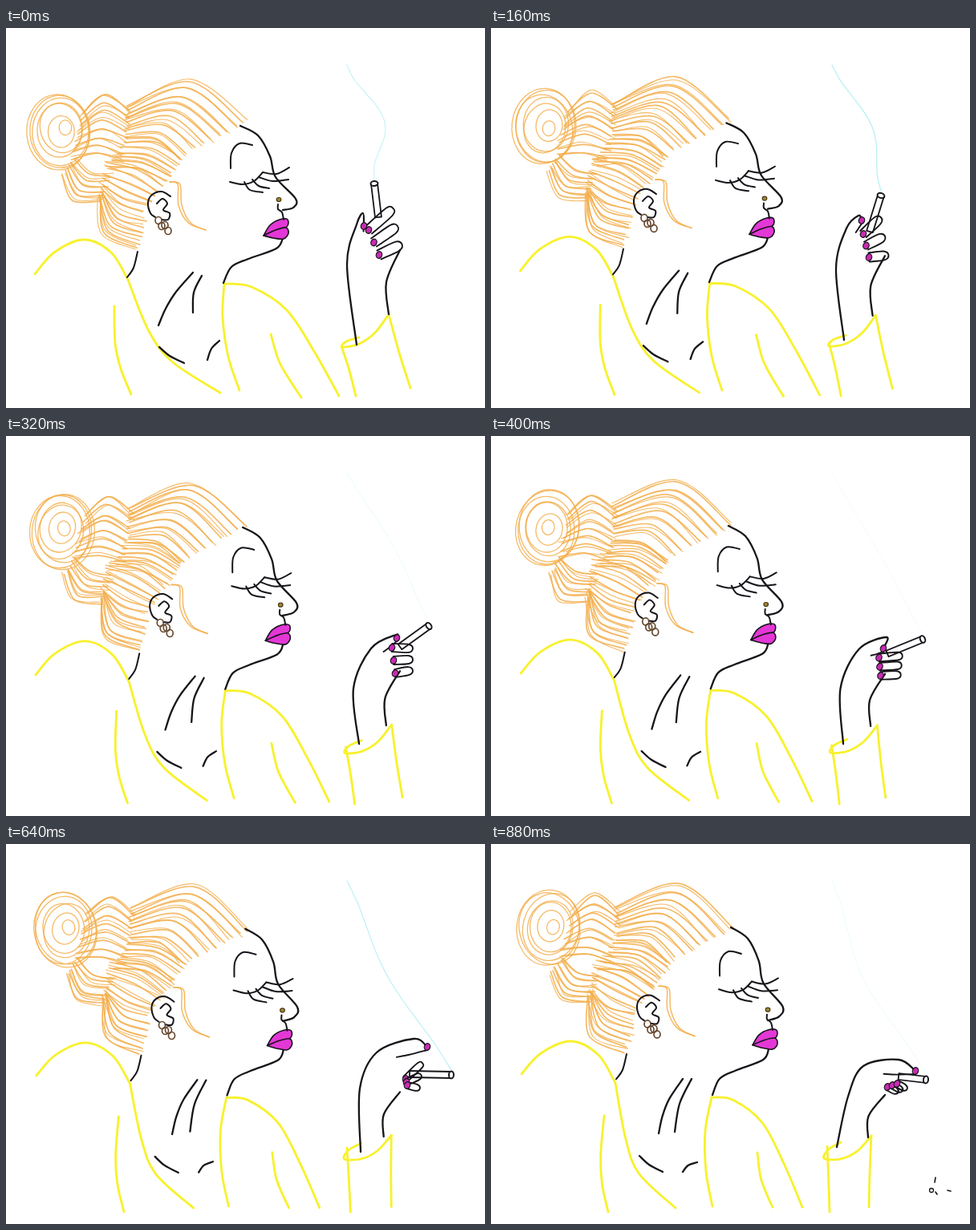
Animation of 597x474 px, one loop 960 ms. Source, as an HTML page with a canvas:

```html
<!DOCTYPE html>
<html lang="en">
<head>
<meta charset="utf-8">
<title>Smoker</title>
<style>
html, body { margin: 0; width: 100%; height: 100%; overflow: hidden; background: #fff; }
canvas { display: block; }
</style>
</head>
<body>
<canvas id="stage" width="597" height="474"></canvas>
<script>
const g = document.getElementById('stage').getContext('2d');
const INK = '#17141a', YELLOW = '#f8f12c', HAIR = '#f4ae4c', PINK = '#e337d6', SMOKE = '#b5eff5';
const STEP = 80, COUNT = 12;

const mix = (a, b, k) => a + (b - a) * k;
const rnd = n => { const v = Math.sin(n * 127.1 + 11.7) * 43758.5453; return v - Math.floor(v); };

// Key poses sit on every second drawing, the last two close together.
const poseAt = step => step < 9 ? step / 2 : step === 9 ? 5 : step / 2 + .5;

function at(poses, p) {
  const a = poses[Math.floor(p)], b = poses[Math.ceil(p)];
  return a.map ? a.map((v, i) => mix(v, b[i], p % 1)) : mix(a, b, p % 1);
}

function curve(c, color, width, fill) {
  const n = c.length / 2 - 1;
  const pt = i => { const j = 2 * Math.max(0, Math.min(n, i)); return [c[j], c[j + 1]]; };
  g.beginPath();
  g.moveTo(c[0], c[1]);
  for (let i = 0; i < n; i++) {
    const [a, b, d, e] = [pt(i - 1), pt(i), pt(i + 1), pt(i + 2)];
    g.bezierCurveTo(b[0] + (d[0] - a[0]) / 6, b[1] + (d[1] - a[1]) / 6,
      d[0] - (e[0] - b[0]) / 6, d[1] - (e[1] - b[1]) / 6, d[0], d[1]);
  }
  paint(color, width, fill);
}

function oval(x, y, rx, ry, color, width, fill, turn = 0) {
  g.beginPath();
  g.ellipse(x, y, rx, ry, turn, 0, 7);
  paint(color, width, fill);
}

function paint(color, width, fill) {
  if (fill) { g.fillStyle = fill; g.fill(); }
  g.strokeStyle = color;
  g.lineWidth = width;
  g.stroke();
}

// The head tips back: the further left, the higher it lifts.
const tilt = [0, .2, .45, .65, .9, .9, 1];
const sway = [0, 3, 5, 7, 6, 5, 0];
const tip = (c, k) => c.map((v, i) => v + k * (i % 2 ? c[i - 1] * .055 - 26 : 5));

// Slides a stroke, blending the travel of its first and last point.
const slide = (c, [x, y, X, Y], k) => c.map((v, i) => {
  const u = (i >> 1) / (c.length / 2 - 1);
  return v + k * (i % 2 ? mix(y, Y, u) : mix(x, X, u));
});

const coat = [
  ['36 307 60 280 97 264 131 280 152 314', '2 -20 3 -16'],
  ['152 314 178 378 208 417 267 455', '3 -16 -37 -1'],
  ['135 347 136 393 143 425 156 457', '6 -8 -10 2'],
  ['272 319 270 360 277 410 291 452', '3 -3 -15 0'],
  ['272 319 306 323 350 352 385 405 415 459', '3 -3 -27 -6'],
  ['330 382 340 415 353 438 368 461', '2 3 -17 -8']
];
const sleeve = [
  ['418 397 427 424 436 459', '1 -20 -14 0'],
  ['477 357 490 405 504 449', '-3 7 -33 4'],
  ['440 386 424 391 419 398 440 394 460 380 477 357', '-4 -14 -3 7']
];
const neck = [
  ['233 305 212 329 199 350 190 371', '6 -12 19 -10'],
  ['244 309 234 330 233 355', '6 -16 -4 4'],
  ['191 398 204 409 222 418', '-6 -9 -8 -9'],
  ['251 414 256 400 266 390', '-12 -5 -9 7'],
  ['345 262 337 275 302 288 281 298 271 318', '1 -6 5 -5'],
  ['292 122 314 134 329 160 336 186 361 213 358 224 345 227', '7 -18 0 -7'],
  ['477 357 474 317 491 277', '-7 9 0 36']
];
const head = [
  '280 175 281 156 291 144 307 146',
  '279 192 295 195 309 191 320 180',
  '320 180 337 182 353 174',
  '315 186 332 191 352 189',
  '297 192 304 202 320 205',
  '307 189 315 197 328 200',
  '339 220 339 226 344 230 346 239',
  '205 210 194 204 182 208 177 218 180 231 186 236',
  '188 219 195 213 201 219 196 227 204 231 202 239 194 239',
  '164 279 159 299 151 311'
];
const lips = [
  '321 259 329 246 341 239 351 239 350 248 336 253 321 259',
  '321 259 336 252 349 249 352 256 346 263 333 262 321 259'
];
const nums = s => s.split(' ').map(Number);
const parse = list => list.map(s => Array.isArray(s) ? s.map(nums) : nums(s));
const [COAT, SLEEVE, NECK, HEAD, LIPS] = [coat, sleeve, neck, head, lips].map(parse);

// Hair lobes: strand count, first strand, last strand, first and last bulge
const lobes = [
  [9, [150, 97, 297, 116], [150, 138, 215, 162], 42, 12],
  [6, [148, 142, 218, 163], [128, 172, 200, 192], 10, 8],
  [8, [95, 108, 155, 104], [82, 163, 145, 165], 22, 6],
  [6, [84, 163, 130, 184], [70, 183, 118, 217], -8, -18],
  [6, [125, 166, 195, 196], [118, 202, 172, 228], 8, -7],
  [6, [120, 203, 174, 240], [117, 212, 163, 276], -10, -24]
];
const lock = [204, 192, 217, 195, 219, 221, 230, 243, 249, 252];

function drawHair(k, step) {
  let seed = step * 300;
  const shake = r => (rnd(++seed) - .5) * 2 * r;
  g.globalAlpha = .85;
  for (const [n, first, last, b0, b1] of lobes) {
    const [a, z] = [tip(first, k), tip(last, k)];
    for (let i = 0; i < n * 2; i++) {
      const u = (i >> 1) / (n - 1), r = i % 2 ? 4 : 2;
      const [x, y, X, Y] = a.map((v, j) => mix(v, z[j], u) + shake(r));
      const b = (mix(b0, b1, u) + shake(2)) / Math.hypot(X - x, Y - y);
      curve([x, y, (x + X) / 2 + b * (Y - y), (y + Y) / 2 - b * (X - x), X, Y], HAIR, i % 2 ? 1.1 : 1.7);
    }
  }
  const [x, y] = tip([67, 127], k);
  for (const s of [1, .96, .9, .72, .66, .42, .2]) {
    oval(x + shake(3) + (1 - s) * 5, y + shake(3), 39 * s, 47 * s, HAIR, 1.3, null, shake(.3));
  }
  for (const w of [0, 4]) {
    curve(tip(lock, k).map((v, i) => i % 2 ? v : v - w * Math.sin(i / 8 * Math.PI)), HAIR, 1.5);
  }
  g.globalAlpha = 1;
}

// Forearm, wrist and index finger, ending at its nail
const arm = [
  '437 395 425 295 437 245 445 231 446 247',
  '440 389 430 300 443 250 458 234 462 240',
  '440 384 433 315 455 265 486 248 487 252',
  '438 384 438 315 462 267 500 254 491 278',
  '442 384 441 305 462 260 508 243 525 253',
  '433 378 443 308 456 270 500 267 533 278',
  '431 378 445 315 464 277 508 269 529 283'
].map(nums);
// Upper nail and knuckle, lower nail and knuckle of the curled fingers
const grip = [
  '452 252 478 229 465 283 488 272',
  '464 257 482 240 471 286 490 284',
  '481 264 502 265 485 296 502 293',
  '486 289 514 284 486 302 510 303',
  '498 293 516 276 500 301 512 304',
  '499 294 514 291 499 300 512 302',
  '494 303 504 308 506 299 515 304'
].map(nums);
const cigarette = [
  '464 236 459 194', '472 254 486 209', '491 263 527 237', '497 280 549 270',
  '503 287 555 288', '510 285 545 295', '508 290 542 294'
].map(nums);
const haze = [.75, 1, .2, .1, .9, .15, .2];

function drawCigarette(p) {
  const [x, y, X, Y] = at(cigarette, p), len = Math.hypot(X - x, Y - y);
  g.save();
  g.translate(x, y);
  g.rotate(Math.atan2(Y - y, X - x));
  g.beginPath();
  g.rect(0, -4, len, 8);
  paint(INK, 1.8, '#fff');
  oval(len, 0, 3, 4.5, INK, 2, '#fff');
  g.restore();
}

function drawSmoke(p, k) {
  const [, , x, y] = at(cigarette, p), c = [];
  for (let u = 0; u <= 1; u += .125) {
    c.push(mix(425, x, u) + mix(30, -20, k) * Math.sin(u * Math.PI) ** 2, mix(46, y - 6, u));
  }
  g.globalAlpha = at(haze, p);
  curve(c, SMOKE, 1.2);
  g.globalAlpha = 1;
}

const nail = (x, y) => oval(x, y, 3.6, 4.4, INK, 1.2, '#c92bb4', .4);

function drawHand(p) {
  const a = at(arm, p), q = at(grip, p);
  const [hx, hy, , , tx, ty] = a.slice(4);
  curve(a, INK, 2.3);
  curve([tx, ty + 4, mix(tx, hx, .4) + 3, mix(ty, hy, .4) + 7, mix(tx, hx, .7) + 6, mix(ty, hy, .7) + 8], INK, 1.9);
  const r = mix(6, 4, Math.min(1, p / 4));
  for (const u of [0, .5, 1]) {
    const [x, y, X, Y] = [0, 1, 2, 3].map(i => mix(q[i], q[i + 4], u));
    const d = Math.hypot(X - x, Y - y), dx = (X - x) / d * r, dy = (Y - y) / d * r;
    curve([x + dy, y - dx, X + dy, Y - dx, X + dx, Y + dy, X - dy, Y + dx, x - dy, y + dx], INK, 1.9);
    nail(x, y);
  }
  nail(tx, ty);
}

function drawAsh(step) {
  if (step < 9) return;
  const k = (step - 9) / 2, y = mix(306, 432, k);
  oval(549, y, 2.5, 2.5, INK, 1.3);
  g.beginPath();
  g.moveTo(553, y - mix(2, 10, k));
  g.lineTo(554, y - mix(5, 16, k));
  g.moveTo(554, y + mix(8, 2, k));
  g.lineTo(556, y + mix(10, 5, k));
  if (k === 1) { g.moveTo(569, y); g.lineTo(573, y + 1); }
  paint(INK, 1.6);
}

function drawHead(k) {
  for (const c of LIPS) curve(tip(c, k), INK, 1.6, PINK);
  for (const c of HEAD) curve(tip(c, k), INK, 2);
  const [x, y] = tip([190, 240], k);
  for (let i = 0; i < 4; i++) oval(x + i * 4, y + i * 3 + (i % 2) * 4, 4, 4.5, '#66482f', 1.7);
  oval(...tip([340, 214], k), 2.8, 2.5, '#4a3820', 1.2, '#a08a24');
}

function draw(step) {
  const p = poseAt(step), k = at(tilt, p), s = at(sway, p);
  g.fillStyle = '#fff';
  g.fillRect(0, 0, 597, 474);
  g.lineCap = g.lineJoin = 'round';
  drawSmoke(p, k);
  drawHair(k, step);
  for (const [c, d] of COAT) curve(slide(c, d, k), YELLOW, 2.8);
  for (const [c, d] of SLEEVE) curve(slide(c, d, k).map((v, i) => i % 2 ? v : v + s), YELLOW, 2.8);
  for (const [c, d] of NECK) curve(slide(c, d, k), INK, 2.3);
  drawHead(k);
  drawCigarette(p);
  drawHand(p);
  drawAsh(step);
}

const start = performance.now();
let shown = -1;
function tick() {
  const step = Math.floor((performance.now() - start) / STEP) % COUNT;
  if (step !== shown) draw(shown = step);
  requestAnimationFrame(tick);
}
tick();
</script>
</body>
</html>
```
